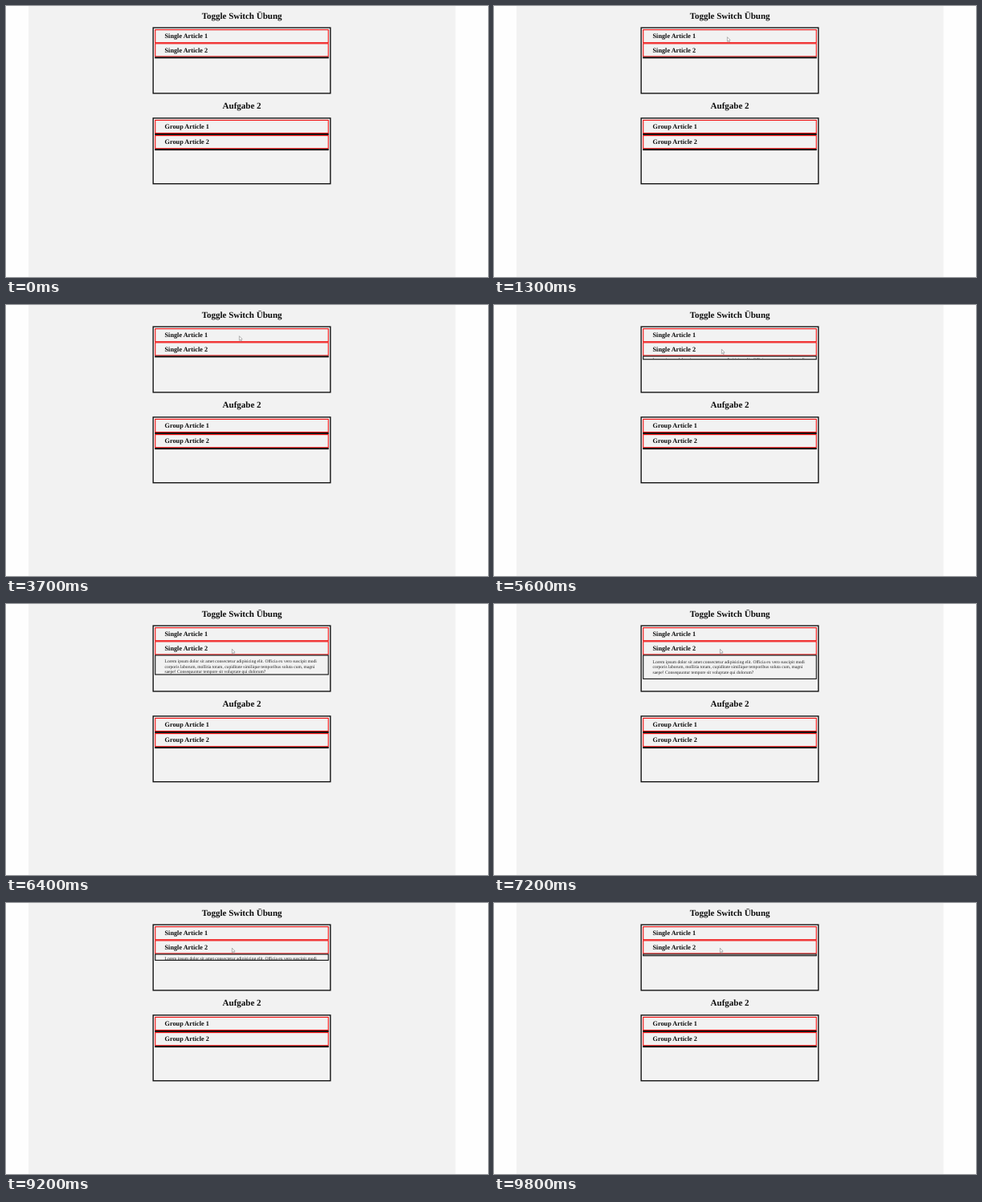
Write an HTML page with a canvas that moves like this. It is 600 px wide and 338 px high and loops after 10000 ms.

```html
<!DOCTYPE html>
<html lang="de">
<head>
<meta charset="utf-8">
<title>Toggle Switch Übung</title>
<style>
  html, body { margin: 0; width: 100%; height: 100%; overflow: hidden; background: #fefefe; }
  canvas { display: block; width: 600px; height: 338px; }
</style>
</head>
<body>
<canvas id="stage"></canvas>
<script>
const W = 600, H = 338, LOOP = 10000, STEP = 100;
const canvas = document.getElementById('stage');
const ctx = canvas.getContext('2d');
const dpr = window.devicePixelRatio || 1;
canvas.width = W * dpr;
canvas.height = H * dpr;

const RED = '#f00b0b', BLACK = '#0c0c0c';
const LEFT = 185.2, WIDTH = 216.6, LABEL_H = 17.2, FOLDED = 1.95;
const FONT = '"Liberation Serif", "Times New Roman", serif';
const LOREM = [
  'Lorem ipsum dolor sit amet consectetur adipisicing elit. Officia ex vero suscipit modi',
  'corporis laborum, mollitia totam, cupiditate similique temporibus soluta cum, magni',
  'saepe! Consequuntur tempore sit voluptate qui dolorum?'
];

// Pointer stops: time, x, y
const PATH = [
  [200, 98, 201], [1300, 290, 38.5], [1850, 290, 38.5], [2400, 277, 77.5],
  [2700, 277, 78], [3200, 290, 38.5], [4200, 290, 38.5], [4400, 284, 53],
  [4600, 284, 53], [4700, 283, 55], [5700, 283, 55], [5900, 281, 56]
];

const clamp = v => Math.min(1, Math.max(0, v));

// The CSS "ease" curve, cubic-bezier(.25, .1, .25, 1)
function ease(p) {
  if (p <= 0 || p >= 1) return clamp(p);
  const bez = (a, b, u) => 3 * a * u * (1 - u) ** 2 + 3 * b * u * u * (1 - u) + u ** 3;
  let lo = 0, hi = 1;
  for (let i = 0; i < 24; i++) {
    const mid = (lo + hi) / 2;
    if (bez(.25, .25, mid) < p) lo = mid; else hi = mid;
  }
  return bez(.1, 1, lo);
}

function frame(x, y, w, h, line, color) {
  ctx.strokeStyle = color;
  ctx.lineWidth = line;
  ctx.strokeRect(x + line / 2, y + line / 2, w - line, h - line);
}

function text(str, x, y, size, weight = 'bold', align = 'left', color = BLACK) {
  ctx.font = `${weight} ${size}px ${FONT}`;
  ctx.textAlign = align;
  ctx.fillStyle = color;
  ctx.fillText(str, x, y);
}

function label(str, y) {
  frame(LEFT, y, WIDTH, LABEL_H, 1.1, RED);
  text(str, 197.5, y + 11.2, 8.25);
}

function lorem(x, y) {
  LOREM.forEach((line, i) => text(line, x, y + i * 6.37, 5.54, 'normal', 'left', '#222'));
}

// Bordered panel; open runs from 0 (folded) to 1
function panel(y, open) {
  const h = FOLDED + 28.7 * open;
  if (open > 0) {
    ctx.save();
    ctx.beginPath();
    ctx.rect(LEFT, y + 1, WIDTH, Math.max(0, h - 2));
    ctx.clip();
    lorem(197.5, y + 10.7 - 4.2 * (1 - open));
    ctx.restore();
    frame(LEFT, y, WIDTH, h, 1.1, BLACK);
  } else {
    ctx.fillStyle = BLACK;
    ctx.fillRect(LEFT, y, WIDTH, h);
  }
}

function pointer(t) {
  if (t < 300) return;
  let i = 0;
  while (i < PATH.length - 2 && t > PATH[i + 1][0]) i++;
  const [t0, x0, y0] = PATH[i], [t1, x1, y1] = PATH[i + 1];
  const p = clamp((t - t0) / (t1 - t0)), k = p * p * (3 - 2 * p);
  ctx.save();
  ctx.translate(x0 + (x1 - x0) * k, y0 + (y1 - y0) * k);
  ctx.beginPath();
  [[.4, .2], [.4, 5.8], [1.6, 4.8], [2.5, 6.7], [3.3, 6.3], [2.5, 4.4], [4.1, 4.2]]
    .forEach(([x, y]) => ctx.lineTo(x, y));
  ctx.closePath();
  ctx.fillStyle = '#fff';
  ctx.fill();
  ctx.strokeStyle = '#777';
  ctx.lineWidth = .55;
  ctx.stroke();
  ctx.restore();
}

function draw(t) {
  ctx.setTransform(dpr, 0, 0, dpr, 0, 0);
  ctx.textRendering = 'geometricPrecision';
  ctx.fillStyle = '#fefefe';
  ctx.fillRect(0, 0, W, H);
  ctx.fillStyle = '#f2f2f2';
  ctx.fillRect(28, 0, 531.5, H);

  text('Toggle Switch Übung', 293.6, 15.5, 11, 'bold', 'center');
  text('Aufgabe 2', 293.6, 128.4, 11, 'bold', 'center');
  for (const y of [26.4, 139.2]) frame(182.5, y, 222, 83.2, 1.35, BLACK);

  const shown = t >= 1900 && t < 3600;
  const second = 46.3 + (shown ? 29.7 : 0);
  const open = ease((t - 5390) / 2000) - ease((t - 8260) / 2000);
  label('Single Article 1', 29.1);
  if (shown) lorem(196.5, 56.8);
  label('Single Article 2', second);
  panel(second + LABEL_H - .1, open);

  [1, 2].forEach(n => {
    const y = 141.9 + (n - 1) * (LABEL_H + FOLDED);
    label('Group Article ' + n, y);
    panel(y + LABEL_H - .1, 0);
  });
  pointer(t);
}

const start = performance.now();
function tick() {
  const t = (performance.now() - start) % LOOP;
  draw(Math.min(9800, Math.floor(t / STEP) * STEP));
  requestAnimationFrame(tick);
}
tick();
</script>
</body>
</html>
```
